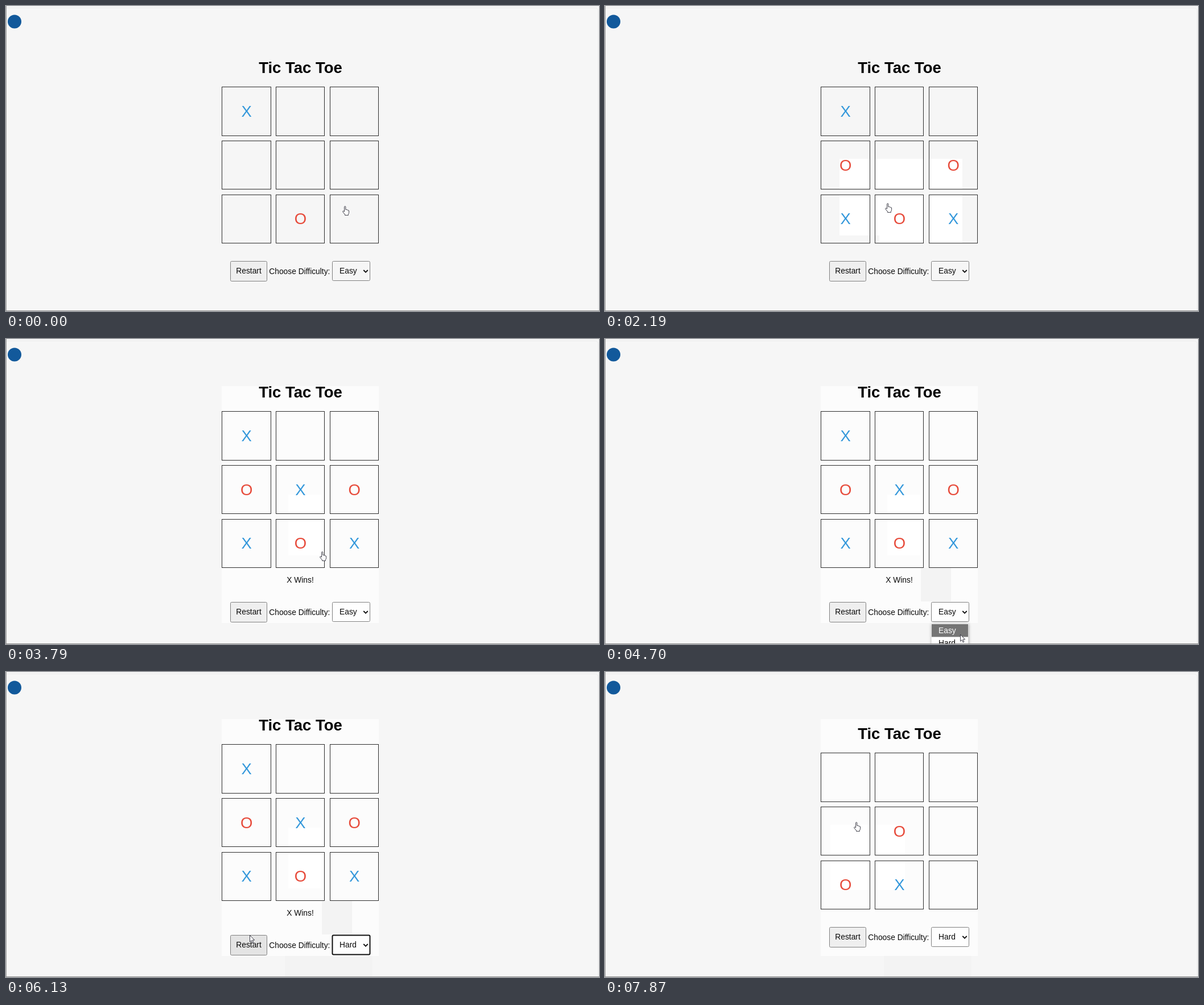
Write an HTML page with a canvas that moves like this. It is 1042 px wide and 537 px high and loops after 7.99 s.

```html
<!DOCTYPE html>
<html lang="en">
<head>
<meta charset="utf-8">
<title>Tic Tac Toe</title>
<style>
html, body { margin: 0; width: 100%; height: 100%; overflow: hidden; background: #f6f6f6; }
canvas { display: block; }
</style>
</head>
<body>
<canvas id="stage" width="1042" height="537"></canvas>
<script>
const ctx = document.getElementById('stage').getContext('2d');
const LOOP = 7990, STEP = 120;
const FONT = '"Liberation Sans", Arial, sans-serif';
const BG = '#f6f6f6', CARD = '#fcfcfc', SHADE = '#f3f3f3', INK = '#0a0a0a';
const COLOR = { X: '#3498db', O: '#e74c3c' };
const GRID = { x: 379, y: 142, pitch: 94.7, size: 85.6 };

// Key moments of the session
const WIN = 3150, LEAVE = 3910, OPEN = 4310, HARD = 4820, PICK = 5350;
const BLUR = 6250, RESET = 6370, RETURN = 6610, REPLY = 7610;

const ROUND1 = [
  { at: 0, cell: 0, mark: 'X' }, { at: 0, cell: 7, mark: 'O' },
  { at: 410, cell: 8, mark: 'X' }, { at: 540, cell: 3, mark: 'O' },
  { at: 1690, cell: 6, mark: 'X' }, { at: 2070, cell: 5, mark: 'O' },
  { at: WIN, cell: 4, mark: 'X' }
];
const ROUND2 = [
  { at: 7120, cell: 7, mark: 'X' },
  { at: REPLY, cell: 4, mark: 'O' }, { at: REPLY, cell: 6, mark: 'O' }
];

// Pointer glides; bx and by bend the path sideways
const glide = (from, to, x, y, bx = 0, by = 0) => ({ from, to, x, y, bx, by });
const GLIDES = [
  glide(150, 270, 613, 382),
  glide(680, 1310, 422, 378, 0, 25),
  glide(1810, 1930, 449, 403),
  glide(2070, 2790, 494, 274, 30),
  glide(3790, 4030, 607, 474),
  glide(4460, 4700, 624, 520),
  glide(HARD, 4970, 613, 545),
  glide(5750, 6130, 428, 463),
  glide(6490, 6730, 455, 374),
  glide(6850, 6970, 486, 356),
  glide(7240, 7360, 397, 358),
  glide(7750, 7870, 437, 264, 22)
];

const HAND = new Path2D('M3.6 10V1.7a1.1 1.1 0 0 1 2.2 0V6.4q1.8-.6 2.1.6q1.7-.5 2 .7q1.7-.3 1.7 1.2' +
  'V11.5q0 2-1.2 3.2V16.4H4.6V15L1 10.8Q.2 9 1.6 8.8Z');
const ARROW = new Path2D('M.5 .5V12.2L3.2 9.7L5 14L6.9 13.2L5.1 9H8.7Z');

function rect(x, y, w, h, color) {
  ctx.fillStyle = color;
  ctx.fillRect(x, y, w, h);
}

function text(str, x, y, { size = 13.8, color = INK, align = 'left', weight = '' } = {}) {
  ctx.font = `${weight} ${size}px ${FONT}`;
  ctx.textAlign = align;
  ctx.fillStyle = color;
  ctx.fillText(str, x, y);
}

function box(x, y, w, h, fill, stroke, line = 1) {
  ctx.beginPath();
  ctx.roundRect(x, y, w, h, 2);
  ctx.fillStyle = fill;
  ctx.fill();
  ctx.strokeStyle = stroke;
  ctx.lineWidth = line;
  ctx.stroke();
}

function cellBox(i, dy) {
  const edge = (start, n) => Math.floor(start + n * GRID.pitch + .6);
  const col = i % 3, row = Math.floor(i / 3);
  const x = edge(GRID.x, col), y = edge(GRID.y, row);
  const right = Math.floor(GRID.x + col * GRID.pitch + GRID.size + .6);
  const bottom = Math.floor(GRID.y + row * GRID.pitch + GRID.size + .5);
  return [x + .5, y + dy + .5, right - x, bottom - y];
}

function page() {
  rect(0, 0, 1042, 537, BG);
  ctx.strokeStyle = '#ececec';
  ctx.lineWidth = 1;
  ctx.beginPath();
  ctx.moveTo(1, 3.5);
  ctx.arcTo(1040.5, 3.5, 1040.5, 537, 5);
  ctx.lineTo(1040.5, 537);
  ctx.stroke();
  ctx.fillStyle = '#12599b';
  ctx.beginPath();
  ctx.arc(15, 27.5, 12, 0, 2 * Math.PI);
  ctx.fill();
}

// Brightens the part of an area that lies inside the cells
function glow(x, y, w, h, dy = 0) {
  ctx.save();
  ctx.beginPath();
  for (let i = 0; i < 9; i++) ctx.rect(...cellBox(i, dy));
  ctx.clip();
  rect(x, y, w, h, '#fff');
  ctx.restore();
}

function backdrop(t, dy) {
  if (t < WIN) {
    if (t >= 540) glow(412, 269, 216, 135);
    if (t >= 680) glow(482, 404, 146, 20);
    return;
  }
  if (t >= 5750) rect(490, 499, 154, 37, SHADE);
  rect(379, 83, 276, 417, CARD);
  if (t >= RESET) {
    if (t >= REPLY) glow(396, 269, 131, 115);
    return;
  }
  if (t >= 3790) glow(496, 274, 58, 107, dy);
  if (t >= LEAVE) rect(555, 403, 53, 59, SHADE);
}

function board(t, dy) {
  ctx.strokeStyle = '#2e2e2e';
  ctx.lineWidth = 1;
  for (let i = 0; i < 9; i++) ctx.strokeRect(...cellBox(i, dy));
  for (const { at, cell, mark } of t < RESET ? ROUND1 : ROUND2) {
    if (t < at) continue;
    const x = GRID.x + 43.7 + (cell % 3) * GRID.pitch;
    const y = GRID.y + 53 + Math.floor(cell / 3) * GRID.pitch + dy;
    text(mark, x, y, { size: 27.5, align: 'center', color: COLOR[mark] });
  }
}

function controls(t, dy) {
  const y = 449.5 + dy, base = y + 21.8;
  const hover = t >= 5990 && t < 6490;
  const focus = t >= PICK && t < BLUR;
  box(394.5, y, 64, 35, hover ? '#e4e4e4' : '#efefef', '#808080');
  text('Restart', 426.5, base, { align: 'center' });
  text('Choose Difficulty:', 462.3, base + .5);
  box(573.5, y, 66, 34, t < WIN ? BG : '#fefefe', focus ? '#101010' : '#808080', focus ? 2 : 1);
  text(t < PICK ? 'Easy' : 'Hard', 586, base);
  ctx.strokeStyle = INK;
  ctx.lineWidth = 1.8;
  ctx.beginPath();
  ctx.moveTo(628.3, y + 15.5);
  ctx.lineTo(632, y + 19.3);
  ctx.lineTo(635.7, y + 15.5);
  ctx.stroke();
}

function popup(t) {
  if (t < OPEN || t >= PICK) return;
  ctx.save();
  ctx.shadowColor = 'rgba(0,0,0,.5)';
  ctx.shadowBlur = 5;
  ctx.shadowOffsetY = 1;
  rect(573.5, 501, 65, 50, '#fff');
  ctx.restore();
  ['Easy', 'Hard'].forEach((name, i) => {
    const active = i === (t < HARD ? 0 : 1);
    if (active) rect(574, 502 + i * 22.5, 64, 22.5, '#757575');
    text(name, 586, 518 + i * 22, { color: active ? '#fff' : INK });
  });
}

// The pointer advances in visible steps, slowing down towards each stop
function pointerAt(t) {
  let x = 591, y = 352;
  for (const g of GLIDES) {
    if (t < g.from) break;
    const steps = Math.round((g.to - g.from) / STEP) + 1;
    const p = Math.min(1, (Math.floor((t - g.from) / STEP) + 1) / steps);
    const ease = Math.sin(p * Math.PI / 2), bend = Math.sin(p * Math.PI);
    x += (g.x - x) * ease + g.bx * bend;
    y += (g.y - y) * ease + g.by * bend;
  }
  return [Math.round(x), Math.round(y)];
}

function pointer(t) {
  const shape = t < LEAVE || t >= RETURN ? HAND : ARROW;
  ctx.save();
  ctx.translate(...pointerAt(t));
  ctx.lineJoin = 'round';
  ctx.lineWidth = .9;
  ctx.fillStyle = '#fff';
  ctx.strokeStyle = '#2a2a36';
  ctx.fill(shape);
  ctx.stroke(shape);
  ctx.restore();
}

function draw(t) {
  const won = t >= WIN && t < RESET;
  const rise = won ? -15 : 0;
  page();
  backdrop(t, rise);
  text('Tic Tac Toe', 517.5, won ? 103.3 : 117.8,
    { size: 27.5, align: 'center', weight: 'bold', color: '#000' });
  board(t, rise);
  if (won) text('X Wins!', 517, 429, { align: 'center' });
  controls(t, won ? 14 : 0);
  popup(t);
  pointer(t);
  rect(0, 0, 1, 537, '#a0a0a0');
  rect(0, 536, 1042, 1, '#8f8f8f');
}

function tick() {
  draw(performance.now() % LOOP);
  requestAnimationFrame(tick);
}
tick();
</script>
</body>
</html>
```
